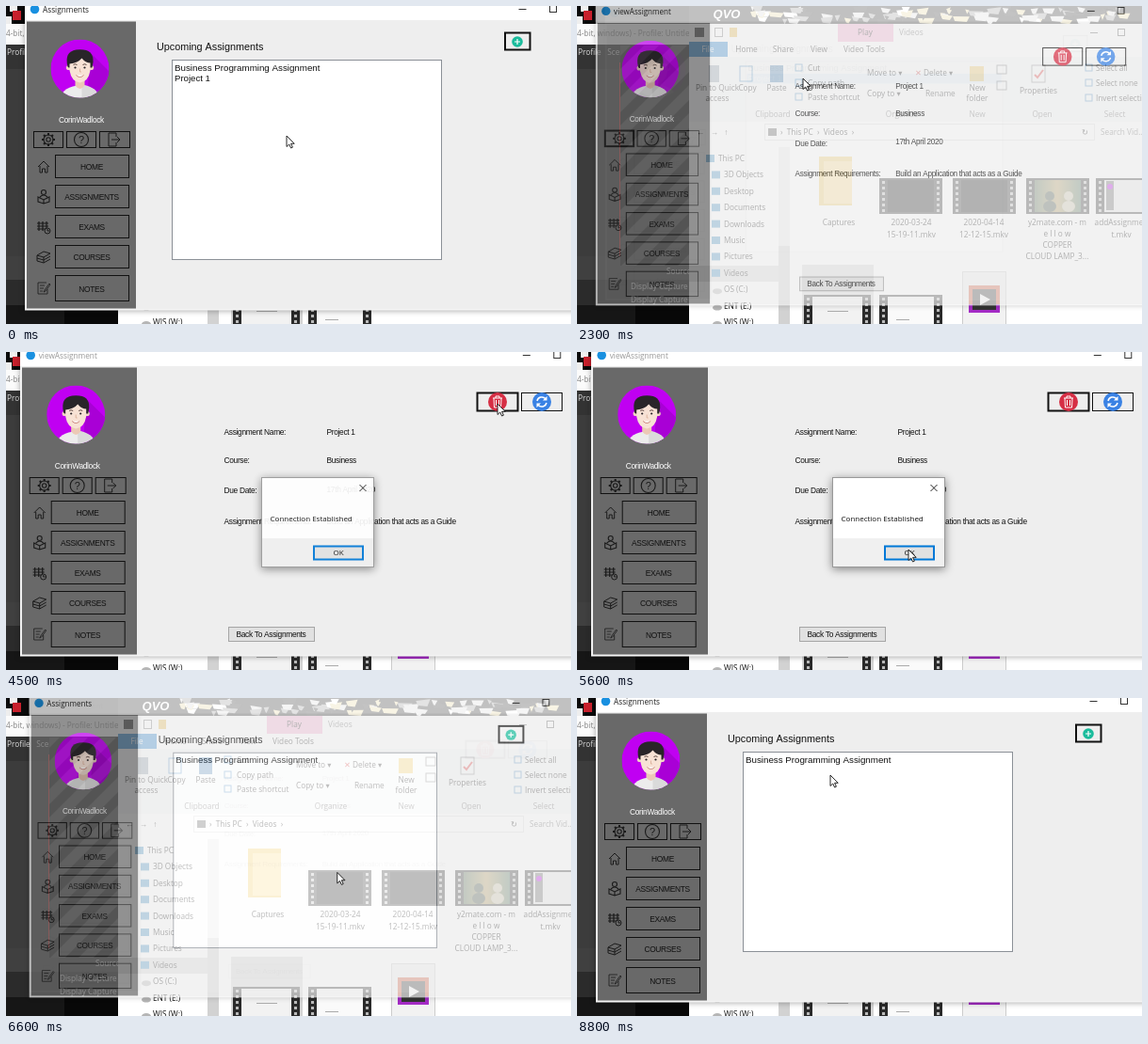
An HTML page with a canvas that plays this animation: 600 px wide and 338 px high, repeating every 9 s.

```html
<!DOCTYPE html>
<html lang="en">
<head>
<meta charset="utf-8">
<title>Assignments</title>
<style>
  html, body { margin: 0; width: 100%; height: 100%; overflow: hidden; background: #000; }
  canvas { display: block; width: 600px; height: 338px; }
</style>
</head>
<body>
<canvas id="stage" width="600" height="338"></canvas>
<script>
const W = 600, H = 338, LOOP = 9000;
const stage = document.getElementById('stage').getContext('2d');
const layer = document.createElement('canvas');
layer.width = W; layer.height = H;
const layerCtx = layer.getContext('2d');
let g = stage;

const SANS = '"Liberation Sans", Arial, sans-serif';
const UI = '"Open Sans", "Noto Sans", sans-serif';
const clamp = v => Math.max(0, Math.min(1, v));
const ease = p => 1 - Math.pow(1 - clamp(p), 1.75);

function box(x, y, w, h, c) { g.fillStyle = c; g.fillRect(x, y, w, h); }
function frame(x, y, w, h, c = '#111', lw = 1) {
  g.strokeStyle = c; g.lineWidth = lw; g.strokeRect(x, y, w, h);
}
function oval(x, y, rx, ry, c) {
  g.fillStyle = c; g.beginPath(); g.ellipse(x, y, rx, ry, 0, 0, 7); g.fill();
}
function disc(x, y, r, c) { oval(x, y, r, r, c); }
function path(d, x, y, stroke, fill, lw = 1) {
  g.save(); g.translate(x, y);
  const p = new Path2D(d);
  if (fill) { g.fillStyle = fill; g.fill(p); }
  if (stroke) { g.strokeStyle = stroke; g.lineWidth = lw; g.stroke(p); }
  g.restore();
}
// y is the middle of the capital letters
function text(s, x, y, size, { font = SANS, c = '#111', align = 'left', gap = 0, style = '' } = {}) {
  g.font = `${style} ${size}px ${font}`;
  g.letterSpacing = gap + 'px';
  g.textAlign = align; g.fillStyle = c;
  g.fillText(s, x, y + size * 0.36);
}
const small = (s, x, y, o) => text(s, x, y, 8.4, { gap: -0.32, ...o });
const ui = (s, x, y, o) => text(s, x, y, 8.25, { font: UI, ...o });

/* ---- desktop behind the window ---- */
function recorder() {
  box(0, 0, 120, 20, '#0b0b0b');
  box(4, 0, 8, 6, '#f1f1f1');
  box(7, 5, 9, 10, '#c8202c');
  box(0, 11, 6, 8, '#eee');
  box(0, 19, 120, 22, '#fbfbfb');
  ui('4-bit, windows) - Profile: Untitled', 0, 29.5, { c: '#888' });
  box(0, 41, 120, 26, '#333');
  ui('Profile   Scene Collection   Tools', 1, 49, { c: '#ddd' });
  box(0, 67, 120, 199, '#3c3c3c');
  g.save();
  g.beginPath(); g.rect(46, 42, 74, 234); g.clip();
  box(46, 42, 74, 234, '#484848');
  for (let y = 40; y < 420; y += 30)
    path('M0 0 L100 -100', 36, y, '#1c1c1c', null, 10);
  g.restore();
  box(45, 60, 1, 216, '#d33');
  box(0, 266, 46, 25, '#404040');
  box(46, 276, 74, 15, '#404040');
  box(0, 291, 120, 27, '#2b2b2b');
  ui('Sources', 95, 282, { c: '#eee' });
  ui('Display Capture 2', 57, 298, { c: '#eee' });
  ui('Display Capture', 57, 312, { c: '#eee' });
  box(0, 318, 62, 20, '#161616');
  box(62, 318, 58, 20, '#080808');
}

// loose comic-like scraps along the top edge
function wallpaper() {
  let seed = 11;
  const rnd = () => (seed = seed * 16807 % 2147483647) / 2147483647;
  const tones = ['#fff', '#ddd', '#999', '#222', '#e8d9a0'];
  box(119, 0, 481, 19, '#1a1a1a');
  for (let i = 0; i < 90; i++) {
    const x = 184 + rnd() * 410, y = rnd() * 14, w = 4 + rnd() * 14;
    path(`M0 0 L${w} ${rnd() * 4 - 2} L${w - 3} 6 L2 5 Z`, x, y, null, tones[Math.floor(rnd() * 5)]);
  }
  text('QVO', 159, 8, 13, { c: '#fff', align: 'center', style: 'italic bold' });
}

function film(x, y, w, h, inner) {
  box(x, y, w, h, '#2a2a2a');
  box(x + 9, y + 2, w - 18, h - 4, inner);
  for (let i = y + 3; i < y + h - 2; i += 6) {
    box(x + 3, i, 3, 3, '#bbb');
    box(x + w - 6, i, 3, 3, '#bbb');
  }
}

function explorer(late) {
  const mid = { align: 'center' }, label = { align: 'center', c: '#666' };
  box(119, 0, 481, H, '#fff');
  wallpaper();
  box(119, 19, 481, 19, '#fff');
  box(125, 23, 10, 10, '#333');
  frame(146.5, 23.5, 8, 9, '#777');
  box(162, 23, 8, 10, '#e9b749');
  box(277, 19, 59, 19, '#f4a9cd');
  ui('Play', 306, 28, mid);
  ui('Videos', 342, 28, { c: '#666' });
  box(545, 28, 8, 1, '#555');
  frame(574.5, 24.5, 7, 7, '#555');
  box(119, 38, 41, 16, '#1979ca');
  ui('File', 139, 46, { align: 'center', c: '#fff' });
  [['Home', 180], ['Share', 219], ['View', 257], ['Video Tools', 305]]
    .forEach(([s, x]) => ui(s, x, 46, mid));
  box(119, 54, 481, 69, '#f5f6f7');
  box(140, 63, 11, 18, '#8d9ba8');
  ui('Pin to Quick', 149, 87, mid); ui('access', 149, 98, mid);
  frame(173, 64, 13, 16, '#4386bd'); ui('Copy', 181, 87, mid);
  box(205, 63, 14, 18, '#4a7fae'); ui('Paste', 212, 87, mid);
  [['Cut', 66], ['Copy path', 82], ['Paste shortcut', 97]].forEach(([s, y]) => {
    frame(232, y - 4, 7, 7, '#4386bd'); ui(s, 245, y);
  });
  ui('Move to ▾', 308, 71); ui('Copy to ▾', 308, 93);
  ui('✕', 359, 71, { c: '#c22' }); ui('Delete ▾', 368, 71); ui('Rename', 370, 93);
  box(417, 64, 15, 16, '#eac35c');
  ui('New', 425, 87, mid); ui('folder', 425, 98, mid);
  frame(446, 63, 10, 9, '#777'); frame(446, 80, 10, 9, '#777');
  frame(483, 63, 14, 18, '#888');
  path('M-4 0 L-1 3 L5 -5', 490, 73, '#d33', null, 2);
  ui('Properties', 490, 90, mid);
  ['Select all', 'Select none', 'Invert selection'].forEach((s, i) => {
    frame(540, 62 + i * 16, 7, 7, '#4386bd');
    ui(s, 551, 66 + i * 16);
  });
  [['Clipboard', 208], ['Organize', 345], ['New', 425], ['Open', 494], ['Select', 571]]
    .forEach(([s, x]) => ui(s, x, 115, label));
  frame(199.5, 125.5, 350, 17, '#ddd');
  ui('←   →   ↑', 127, 134);
  box(203, 130, 9, 8, '#555');
  ui('›  This PC  ›  Videos  ›', 216, 134);
  ui('↻', 536, 134);
  ui('Search Vid...', 556, 134, { c: '#666' });

  box(119, 276, 107, 17, '#d9d9d9');
  ['This PC', '3D Objects', 'Desktop', 'Documents', 'Downloads', 'Music', 'Pictures', 'Videos',
    'OS (C:)', 'ENT (E:)', 'WIS (W:)'].forEach((s, i) => {
    const y = 162 + i * 17.4;
    if (i < 8) box(i ? 143 : 137, y - 4, 9, 8, '#4190c4');
    else oval(149, y + 2, 5, 3, '#b5b5b5');
    ui(s, i ? 156 : 150, y);
  });
  box(214, 150, 12, H - 150, '#ededed');
  box(214, 255, 12, H - 255, '#d2d2d2');

  box(257, 160, 35, 52, '#f3cd68');
  box(262, 165, 30, 45, '#ffe091');
  ui('Captures', 278, 230, mid);
  film(321, 183, 67, 38, '#111');
  film(399, 183, 67, 38, '#111');
  const photo = g.createLinearGradient(477, 0, 543, 0);
  photo.addColorStop(0, '#2c5a4c'); photo.addColorStop(.5, '#b39a5c'); photo.addColorStop(1, '#2c6258');
  film(477, 183, 67, 38, photo);
  oval(502, 213, 7, 6, '#3f4c3f'); disc(502, 202, 5, '#3f4c3f');
  oval(522, 213, 7, 6, '#ccc2a8'); disc(522, 202, 5, '#ccc2a8');
  film(551, 183, 60, 38, '#e8e8e8');
  box(562, 186, 8, 31, '#696969'); disc(566, 192, 3, '#b900ea');
  [['2020-03-24', 355, 230], ['15-19-11.mkv', 355, 243], ['2020-04-14', 432, 230],
    ['12-12-15.mkv', 432, 243], ['y2mate.com - m', 510, 230], ['e l l o w', 510, 242],
    ['COPPER', 510, 254], ['CLOUD LAMP_3...', 510, 266], ['addAssignmen', 578, 230],
    ['t.mkv', 578, 243]].forEach(([s, x, y]) => ui(s, x, y, mid));

  box(239, 275, 76, 63, '#d5d5d5');
  film(241, 307, 71, 44, '#f2f2f2');
  box(266, 324, 22, 1, '#aaa');
  film(321, 307, 67, 44, '#fafafa');
  box(339, 333, 14, 1, '#aaa');
  if (late) {
    box(410, 283, 46, 55, '#f2f2f2');
    frame(409.5, 282.5, 46, 56, '#ccc');
    box(416, 297, 33, 29, '#d4573c');
    box(416, 317, 33, 9, '#a42bc5');
    box(420, 301, 25, 22, '#333');
    path('M0 0 L11 6 L0 12 Z', 428, 306, null, '#fff');
  }
}

/* ---- application window ---- */
const INK = '#1a1a1a';
const MENU = [['HOME', 159, 24], ['ASSIGNMENTS', 191, 24], ['EXAMS', 223, 24], ['COURSES', 255, 24], ['NOTES', 287, 27]];

function avatar(x, y) {
  g.save();
  g.translate(x, y);
  g.beginPath(); g.arc(0, 0, 31, 0, 7); g.clip();
  box(-31, -31, 62, 62, '#c000f2');
  path('M10 -18 L40 12 V40 H8 Z', 0, 0, null, '#a900d6');
  oval(0, 31, 20, 13, '#ececec');
  path('M2 17 Q20 20 20 32 H2 Z', 0, 0, null, '#dadada');
  path('M-5 8 V18 Q0 25 5 18 V8 Z', 0, 0, null, '#ecc9b6');
  disc(-12, -1, 2.6, '#f0d3c3'); disc(12, -1, 2.6, '#f0d3c3');
  path('M-13 -2 Q-17 -18 -4 -20 Q15 -22 14 -7 L13 -1 H-12 Z', 0, 0, null, '#292529');
  path('M-11 -5 Q-2 -6 2 -11 Q6 -6 11 -6 V2 Q9 14 0 15 Q-9 14 -11 2 Z', 0, 0, null, '#f8e2d5');
  disc(-5, -1, 1.1, '#292529'); disc(5, -1, 1.1, '#292529');
  path('M-7 -4 Q-5 -5.5 -3 -4 M3 -4 Q5 -5.5 7 -4', 0, 0, '#4a3530', null, .9);
  path('M-4 7 Q0 11 4 7 Z', 0, 0, null, '#fff');
  path('M-4 7 Q0 11 4 7', 0, 0, '#b4574d', null, .7);
  path('M0 0 V3.5 H1.5', 0, 0, '#d9ab95', null, .8);
  g.restore();
}

function gear(x, y) {
  for (let i = 0; i < 8; i++) {
    const a = i * Math.PI / 4, c = Math.cos(a), s = Math.sin(a);
    path(`M${c * 4.6} ${s * 4.6} L${c * 7} ${s * 7}`, x, y, INK, null, 2);
  }
  g.strokeStyle = INK; g.lineWidth = 1.1;
  for (const r of [5, 2.2]) { g.beginPath(); g.arc(x, y, r, 0, 7); g.stroke(); }
}

function sidebar(shift, gearFocus) {
  g.save();
  g.translate(shift, 0);
  avatar(78.5, 66.5);
  small('CorinWadlock', 80, 121, { c: '#fff', align: 'center' });
  frame(29.5, 133.5, 31, 17, '#111', gearFocus ? 2 : 1);
  frame(64.5, 133.5, 31, 17);
  frame(99.5, 133.5, 32, 17);
  gear(45, 142);
  g.beginPath(); g.arc(80, 142, 7.5, 0, 7); g.stroke();
  text('?', 80, 142, 11, { c: INK, align: 'center' });
  path('M3 -3 V-7 H-5 V7 H3 V3 M-2 0 H7 M4 -3 L7 0 L4 3', 114, 142, INK);
  for (const [s, y, h] of MENU) {
    frame(52.5, y - .5, 78, h);
    small(s, 91, y + h / 2, { align: 'center' });
  }
  path('M-6 0 L0 -6 L6 0 M-4 -1 V6 H-1.5 V2 H1.5 V6 H4 V-1', 40, 171, INK);
  path('M-2.5 -4 A2.5 2.5 0 1 0 2.5 -4 A2.5 2.5 0 1 0 -2.5 -4 M-6 1 L0 4 L6 1 V6 L0 8 L-6 6 Z M0 4 V8 M-4 1 Q0 -3 4 1', 40, 202, INK, null, 1.1);
  path('M-7 -4 H5 M-7 -1 H5 M-7 2 H2 M-5 -6 V4 M-1 -6 V4 M3 -6 V1', 40, 235, INK, null, 1.2);
  path('M0 3 A3 3 0 1 0 6 3 A3 3 0 1 0 0 3 M3 1 V3 H5', 41, 236, INK);
  path('M-7 -2 L0 -6 L7 -4 L0 0 Z M-7 -2 V1 L0 3 L7 -1 M-7 1 V4 L0 6 L7 2 M0 0 V6', 40, 267, INK);
  path('M3 -6 H-6 V6 H4 V1 M-4 -3 H1 M-4 0 H0 M-4 3 H-1 M6 -5 L1 2 L0 4 L2 3 L7 -4 Z', 40, 300, INK, null, .8);
  g.restore();
}

function shell(x, title, right, shift, gearFocus, idle) {
  g.save();
  g.shadowColor = 'rgba(0,0,0,.35)'; g.shadowBlur = 6;
  box(x, -20, 700, 343.5, '#f4f4f4');
  g.restore();
  box(x, -20, 700, 35, '#fff');
  box(x + 1, 15, 700, 307, '#eeeeee');
  box(x + 2, 16.5, right - x - 2, 305, '#696969');
  disc(30.5 + shift, 3.5, 4.8, '#1990e0');
  ui(title, 39 + shift, 4, { c: idle ? '#999' : '#222' });
  const cx = 577.5 - shift;
  box(cx - 33, 3, 8, 1, '#333');
  frame(cx, -.5, 7, 7, '#333');
  sidebar(shift, gearFocus);
}

function listWindow(t) {
  const before = t < 4000, picked = before && t >= 1600;
  shell(20, 'Assignments', 138, 0, false, false);
  text('Upcoming Assignments', 160, 43, 10.8);
  frame(530, 28.5, 26.5, 18, '#111', picked ? 1 : 2);
  disc(543, 38, 5.8, '#1abc9c');
  path('M-3 0 H3 M0 -3 V3', 543, 38, '#fff', null, 1.2);
  box(176, 57, 287, 213, '#fff');
  frame(176.5, 57.5, 286, 212, '#8b9097');
  text('Business Programming Assignment', 179, 65, 9.75);
  if (picked) box(178, 71, 283, 11, '#0078d7');
  if (before) text('Project 1', 179, 76.5, 9.6, { c: picked ? '#fff' : '#111' });
}

function detailWindow(t) {
  const clicked = t >= 3400;
  shell(15, 'viewAssignment', 139, -4.3, !clicked, t >= 4400);
  frame(500.5, 43.5, 43, 19, '#111', clicked ? 2 : 1);
  frame(547.5, 43.5, 43, 19);
  disc(522, 53, 10, '#d62f45');
  path('M-5 -4 H5 M-2 -4 V-6 H2 V-4 M-4 -4 L-3.5 6 H3.5 L4 -4 M-1.5 -2 V4 M1.5 -2 V4', 522, 53, '#fff');
  disc(569, 53, 10, '#3a82e4');
  path('M-5 -1 A5.2 5.2 0 0 1 4 -3.3 M5 1 A5.2 5.2 0 0 1 -4 3.3', 569, 53, '#fff', null, 1.5);
  path('M5.5 -6 V-1.5 H1 Z M-5.5 6 V1.5 H-1 Z', 569, 53, null, '#fff');
  [['Assignment Name:', 'Project 1', 84.5, 84.5], ['Course:', 'Business', 115, 115],
    ['Due Date:', '17th April 2020', 147, 145.5],
    ['Assignment Requirements:', 'Build an Application that acts as a Guide', 180, 180]]
    .forEach(([k, v, y1, y2]) => { small(k, 231.5, y1); small(v, 340.5, y2); });
  box(236, 292, 92, 16, '#e1e1e1');
  frame(236.5, 292.5, 91, 15, '#a5a5a5');
  small('Back To Assignments', 281.5, 300, { align: 'center' });
}

function dialog() {
  g.save();
  g.shadowColor = 'rgba(0,0,0,.45)'; g.shadowBlur = 9; g.shadowOffsetY = 2;
  box(271, 133, 120, 96, '#fff');
  g.restore();
  box(271, 198, 120, 31, '#f0f0f0');
  frame(271.5, 133.5, 119, 95, '#999', 1);
  path('M-3.5 -3.5 L3.5 3.5 M3.5 -3.5 L-3.5 3.5', 379, 144.5, '#222');
  text('Connection Established', 280.5, 177.5, 8, { font: UI });
  box(327, 206, 52, 15, '#e1e1e1');
  frame(327, 206.5, 52, 14, '#0078d7', 2);
  text('OK', 353, 213.5, 8, { font: UI, align: 'center' });
}

/* ---- motion ---- */
const TRACK = [
  [0, 298, 138], [300, 297, 136], [1000, 256, 92], [1600, 240, 77], [2300, 240, 77],
  [3200, 522, 58], [3300, 522, 58], [3500, 522, 55], [4700, 522, 55], [5600, 352, 210],
  [6400, 360.5, 208.5], [7100, 316.5, 92], [7500, 321, 128], [8000, 302, 52],
  [8300, 272, 41], [8550, 246, 64], [8800, 269, 82]
];

function pointer(t) {
  let i = TRACK.findIndex(k => k[0] > t);
  if (i < 0) i = TRACK.length - 1;
  const [t0, x0, y0] = TRACK[i - 1], [t1, x1, y1] = TRACK[i];
  const p = clamp((t - t0) / (t1 - t0)), e = p * p * (3 - 2 * p);
  path('M0 0 V11.5 L2.7 9 L4.6 13 L6.4 12.2 L4.6 8.3 H8.2 Z',
    x0 + (x1 - x0) * e, y0 + (y1 - y0) * e, '#111', '#fff', .9);
}

// draws a whole window as one translucent sheet, zoomed about (235, 90)
function paste(draw, alpha, zoom = 1) {
  if (alpha <= 0) return;
  g = layerCtx;
  g.clearRect(0, 0, W, H);
  g.save();
  g.translate(235, 90); g.scale(zoom, zoom); g.translate(-235, -90);
  draw();
  g.restore();
  g = stage;
  g.globalAlpha = alpha;
  g.drawImage(layer, 0, 0);
  g.globalAlpha = 1;
}

function swap(t, start, from, to) {
  const p = clamp((t - start) / 200), out = clamp((t - start + 100) / 220);
  paste(from, 1 - out, 1 - 0.05 * out);
  paste(to, ease(p), 0.956 + 0.044 * p);
}

function render(t) {
  const list = () => listWindow(t), detail = () => detailWindow(t);
  recorder();
  explorer(t >= 2200);
  if (t < 2200) paste(list, 1);
  else if (t < 6500) swap(t, 2200, list, detail);
  else swap(t, 6500, detail, list);
  paste(dialog, ease((t - 4300) / 260) * (1 - clamp((t - 5800) / 250)));
  pointer(t);
}

function tick(now) {
  render(Math.floor((now % LOOP) / 100) * 100);
  requestAnimationFrame(tick);
}
requestAnimationFrame(tick);
</script>
</body>
</html>
```
